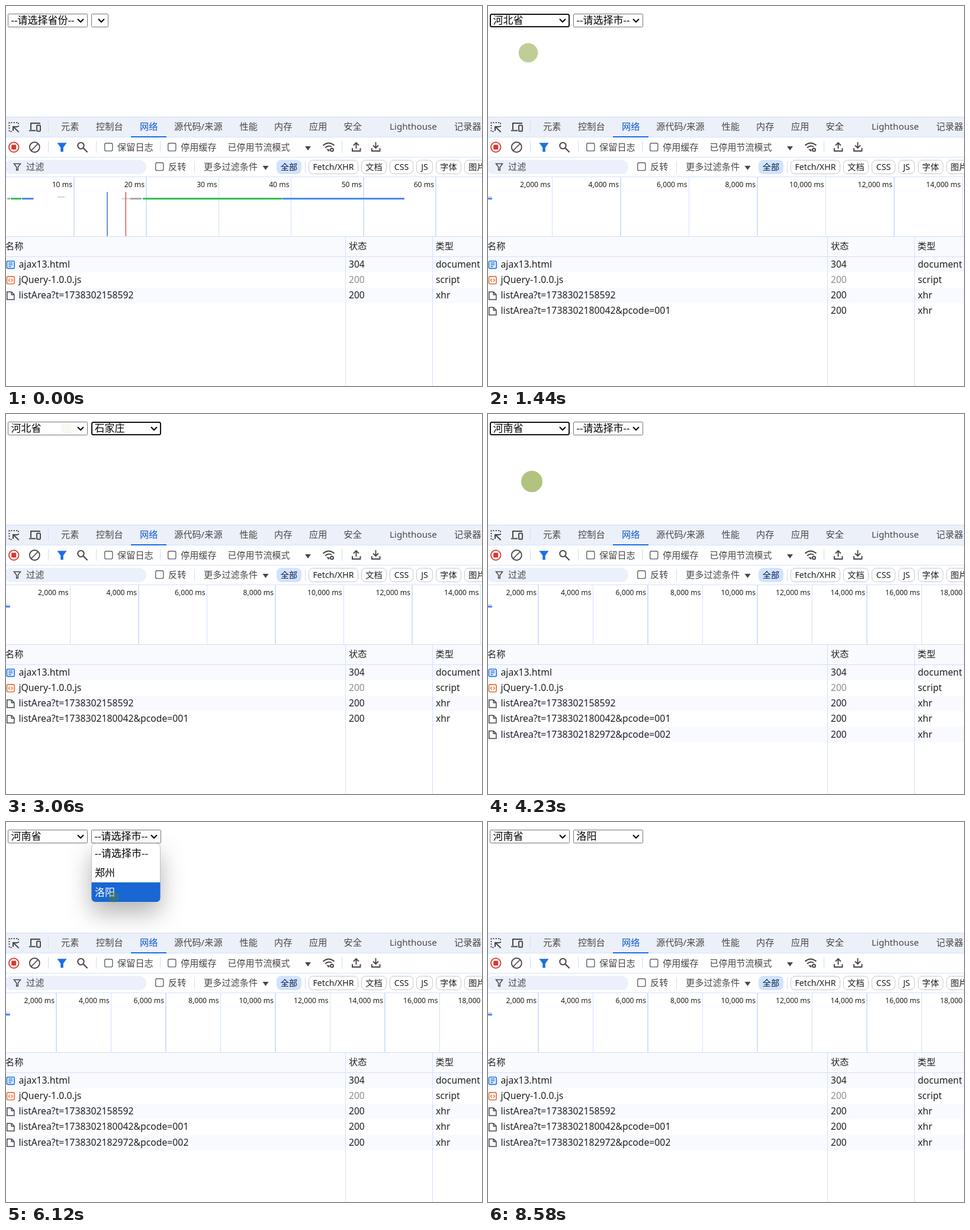
These frames come from a looping animation (804 px wide and 642 px high, 8670 ms). An HTML page:

```html
<!DOCTYPE html>
<html lang="zh-CN">
<head>
<meta charset="utf-8">
<title>省市联动</title>
<style>
  html, body { margin: 0; width: 100%; height: 100%; overflow: hidden; background: #fff; }
  svg { display: block; width: 804px; height: 642px; }
  text { font-family: "Noto Sans", "Noto Sans CJK SC", "Noto Sans CJK", sans-serif; white-space: pre; }
</style>
</head>
<body>
<svg viewBox="0 0 804 642">
  <defs>
    <filter id="shadow" x="-70%" y="-60%" width="240%" height="260%">
      <feDropShadow dx="0" dy="18" stdDeviation="20" flood-color="#000" flood-opacity=".3"/>
    </filter>
  </defs>
  <g id="tools"></g>
  <g id="requests"></g>
  <g id="page"></g>
  <circle id="halo" fill="#648700"/>
</svg>
<script>
const LOOP = 8670, STEP = 90;
const INK = '#474747', DARK = '#1f1f1f', BLUE = '#1a6fe8', LINE = '#d3e1fb';
const $ = id => document.getElementById(id);

const text = (x, y, s, size = 15.2, fill = INK, anchor = 'start') =>
  `<text x="${x}" y="${y}" font-size="${size}" fill="${fill}" text-anchor="${anchor}">${s.replace(/&/g, '&amp;')}</text>`;
const rect = (x, y, w, h, fill, rx = 0, extra = '') =>
  `<rect x="${x}" y="${y}" width="${w}" height="${h}" fill="${fill}" rx="${rx}" ${extra}/>`;
const outline = (x, y, w, h, stroke, rx, width = 1) =>
  rect(x, y, w, h, 'none', rx, `stroke="${stroke}" stroke-width="${width}"`);
const path = (d, stroke = INK, width = 1.7, fill = 'none') =>
  `<path d="${d}" stroke="${stroke}" stroke-width="${width}" fill="${fill}"/>`;
const ring = (x, y, r, stroke, width = 1.8) =>
  `<circle cx="${x}" cy="${y}" r="${r}" fill="none" stroke="${stroke}" stroke-width="${width}"/>`;
const checkbox = (x, y) => outline(x + .7, y + .7, 13.2, 13.2, '#5f6368', 2.5, 1.4);
const triangle = (x, y) => path(`M${x} ${y}h10l-5 7z`, 'none', 0, INK);
const divider = (x, y) => rect(x, y, 1, 20, '#cfdef9');

function drawTools() {
  const tabs = [[93, '元素'], [152, '控制台'], [226, '网络'], [284, '源代码/来源'], [394.5, '性能'],
    [453, '内存'], [512, '应用'], [570.5, '安全'], [648, 'Lighthouse'], [757, '记录器']];
  const chips = [[511, 84, 'Fetch/XHR'], [600, 43, '文档'], [648, 40, 'CSS'], [693, 28, 'JS'],
    [726, 43, '字体'], [774, 43, '图片']];
  return [
    rect(0, 187, 804, 34, '#ecf0f9'),
    ...[187, 221, 255, 288].map(y => rect(0, y, 804, 1, LINE)),
    ...tabs.map(([x, s]) => text(x, 209, s, 15.2, s === '网络' ? '#0b57d0' : INK)),
    rect(211, 220, 60, 2, BLUE),
    // inspect and device icons
    `<g stroke-dasharray="2 2.4">${path('M21 204V197H5.5V212H12', INK, 2)}</g>`,
    path('M21.5 213L12.5 204M12 211V204H20', INK, 2),
    path('M42 209V198H58M39 210.5H50', INK, 2),
    outline(52, 201.5, 6, 10, INK, 1, 1.9),
    divider(71, 194),
    // toolbar
    ring(13.2, 238.5, 8.3, '#dc362e', 1.8), rect(9.2, 234.5, 8, 8, '#dc362e', 1),
    ring(48.3, 238.5, 8.5, INK), path('M42.3 244.5L54.3 232.5'),
    divider(71, 228),
    path('M87 231.5H102L96.5 239V246H92.5V239Z', BLUE, .6, BLUE),
    ring(126.5, 236, 5.2, INK, 2), path('M130.3 239.8L137.5 247', INK, 2.2),
    divider(152, 228), checkbox(166, 231), text(188, 244, '保留日志'),
    divider(260, 228), checkbox(273, 231), text(295, 244, '停用缓存'),
    text(374.5, 244, '已停用节流模式', 15), triangle(505, 237),
    path('M535.5 235.5Q545 227.5 554.5 235.5M539 239.5Q545 234.5 550 238', INK, 2),
    path('M541.5 241.5L545 245.5L546.5 242.5', INK, 1, INK), ring(550.5, 243, 2.5, INK, 2),
    divider(567, 228),
    path('M591.5 241V231.5M587 235.5L591.5 231L596 235.5M585 240V245H598.5V240', INK, 1.9),
    path('M624.5 230V239.5M620 235.5L624.5 240L629 235.5M618 240V245H631.5V240', INK, 1.9),
    // filter bar
    rect(-3, 260, 240, 24, '#ebf0fa', 12),
    path('M13.5 266.5H24.5L20.3 272V277.5H17.7V272Z', INK, 1.5),
    text(34, 277, '过滤'), checkbox(252, 264), text(274, 277, '反转'),
    divider(318, 262), text(334, 277, '更多过滤条件'), triangle(433.5, 270),
    rect(457, 260, 42, 24, '#d3e3fd', 8), text(478, 277, '全部', 14.2, '#041e49', 'middle'),
    divider(505, 262),
    ...chips.map(([x, w, s]) => outline(x + .5, 260.5, w - 1, 23, '#c4c7cc', 7)
      + text(x + w / 2, 277, s, 14.2, DARK, 'middle')),
  ].join('');
}

// Each view: first grid line, spacing, label unit, number of listed requests.
const VIEWS = [
  { x: 115, pitch: 122.2, unit: 10, rows: 3 },
  { x: 108.5, pitch: 115.5, unit: 2000, rows: 4 },
  { x: 85, pitch: 92.5, unit: 2000, rows: 5 },
];
const REQUESTS = [
  ['ajax13.html', '304', 'document'],
  ['jQuery-1.0.0.js', '200', 'script'],
  ['listArea?t=1738302158592', '200', 'xhr'],
  ['listArea?t=1738302180042&pcode=001', '200', 'xhr'],
  ['listArea?t=1738302182972&pcode=002', '200', 'xhr'],
];

function requestIcon(type, y) {
  if (type === 'document')
    return outline(1.5, y - 6, 12.6, 12.4, BLUE, 1.5, 1.6)
      + path(`M4.2 ${y - 2.8}h7.2M4.2 ${y + .2}h7.2M4.2 ${y + 3.2}h4.5`, BLUE, 1.4);
  if (type === 'script')
    return outline(1.5, y - 6, 12.6, 12.4, '#ec6a32', 1.5, 1.6)
      + path(`M6.6 ${y - 2.3}l-2.3 2.5l2.3 2.5M9 ${y - 2.3}l2.3 2.5l-2.3 2.5`, '#ec6a32', 1.4);
  return path(`M1.8 ${y - 6.2}h7.6l4.5 4.5v8.3h-12.1zM9.2 ${y - 6}v4.5h4.5`, INK, 1.5);
}

function drawRequests(view) {
  const { x, pitch, unit, rows } = VIEWS[view];
  let out = '';
  for (let i = 0; i < 9; i++) {
    // A line centred on a pixel edge covers two pixels.
    const lineX = Math.round((x + i * pitch) * 2) / 2;
    const width = Number.isInteger(lineX) ? 2 : 1;
    out += rect(lineX - width / 2, 289, width, 100, LINE);
    out += text(lineX - 3, 306, `${((i + 1) * unit).toLocaleString('en-US')} ms`, 12.2, DARK, 'end');
  }
  const bar = (from, to, fill, y = 324) => rect(from, y, to - from, 3, fill);
  const GREEN = '#34c05a', WAVE = '#4d8bf0';
  out += view
    ? bar(0, 6, '#dedede', 321) + bar(0, 7, WAVE)
    : bar(2, 7, '#a9b5a9') + bar(8, 26, GREEN) + bar(27, 46.5, WAVE) + bar(87, 99, '#dedede', 321)
      + bar(196, 210, '#dcdcdc') + bar(210, 229, '#a9a9a9') + bar(231, 466.5, GREEN) + bar(467, 673, WAVE)
      + rect(170.3, 314, 1.5, 75, '#3f6fc4') + rect(201.7, 314, 1.2, 75, '#d93025');

  out += rect(0, 389, 804, 35, '#f8fafe') + rect(0, 389, 804, 1, LINE) + rect(0, 423, 804, 1, LINE);
  out += text(-1, 411, '名称', 15.2, DARK) + text(579, 411, '状态', 15.2, DARK) + text(725.5, 411, '类型', 15.2, DARK);
  REQUESTS.slice(0, rows).forEach(([name, status, type], i) => {
    const y = 437 + i * 26.15;
    if (i % 2 === 0) out += rect(0, y - 13, 804, 26, '#f8faff');
    out += requestIcon(type, y) + text(21.5, y + 5, name, 15.75, DARK)
      + text(579, y + 5, status, 15.6, i === 1 ? '#8c8c8c' : DARK) + text(726, y + 5, type, 15.6, DARK);
  });
  return out + rect(573, 390, 1, 252, LINE) + rect(720, 390, 1, 252, LINE);
}

const PICK_PROVINCE = '--请选择省份--', PICK_CITY = '--请选择市--';
const PROVINCES = [PICK_PROVINCE, '河北省', '河南省'];
const CITIES = [[], [PICK_CITY, '石家庄', '保定'], [PICK_CITY, '郑州', '洛阳']];

function select(x, w, label, focused) {
  const box = focused
    ? rect(x + 1, 14, w - 2, 21, '#fff', 2.5, 'stroke="#101010" stroke-width="2"')
    : rect(x + .5, 13.5, w - 1, 22, '#fff', 1, 'stroke="#767676"');
  return box + text(x + 5.5, 30, label, 17, '#000')
    + path(`M${x + w - 17} 22l5 5l5 -5`, '#000', 2);
}

function dropdown(x, w, items, hot) {
  const rowTop = i => 36 + i * 33;
  const ends = [
    `M${x} 69V43q0 -7 7 -7h${w - 14}q7 0 7 7V69z`,
    `M${x} 69h${w}v33h${-w}z`,
    `M${x} 102h${w}v26q0 7 -7 7h${14 - w}q-7 0 -7 -7z`,
  ];
  return `<g filter="url(#shadow)">${rect(x, 36, w, 99, '#fff', 7, 'stroke="#b4b4b4" stroke-width=".8"')}</g>`
    + path(ends[hot], 'none', 0, '#1967d2')
    + items.map((s, i) => text(x + 5.5, rowTop(i) + 23, s, 17, i === hot ? '#fff' : '#000')).join('');
}

function drawPage({ province, city, focus, open, hot }) {
  const cities = CITIES[province], cityWidth = cities.length ? 118 : 29;
  let out = select(3, 135, PROVINCES[province], focus === 'province')
    + select(144, cityWidth, cities[city] || '', focus === 'city');
  if (open === 'province') out += dropdown(3.5, 134, PROVINCES, hot);
  if (open === 'city') out += dropdown(144.5, 116, cities, hot);
  return out;
}

const STATES = [];
[
  [0, { province: 0, city: 0, focus: '', open: '', hot: 0, view: 0 }],
  [720, { open: 'province' }],
  [900, { hot: 1 }],
  [1260, { province: 1, focus: 'province', open: '', view: 1 }],
  [2160, { focus: '', open: 'city', hot: 0 }],
  [2250, { hot: 1 }],
  [2520, { city: 1, focus: 'city', open: '' }],
  [3150, { focus: '', open: 'province', hot: 1 }],
  [3420, { hot: 2 }],
  [4140, { province: 2, city: 0, focus: 'province', open: '', view: 2 }],
  [5670, { focus: '', open: 'city', hot: 0 }],
  [5760, { hot: 1 }],
  [5850, { hot: 2 }],
  [6570, { city: 2, focus: 'city', open: '' }],
  [8580, { focus: '' }],
].forEach(([at, change]) => STATES.push({ ...STATES.at(-1), ...change, at }));

// Pointer keys: time, x, y, radius, opacity.
const ripple = (t, x, y) => [[t, x, y, 18, .5], [t + 90, x, y, 16.3, .41], [t + 180, x, y, 13, .22],
  [t + 270, x, y, 10, .05], [t + 360, x, y, 9, 0]];
const TRACKS = [
  [[90, 40, 4, 9, .4], [270, 100, 24, 9, .4], ...ripple(450, 102, 24)],
  [[990, 68, 79, 9, .4], [1170, 68, 79, 9, .4], ...ripple(1350, 68, 79)],
  [[1980, 200, 24, 14, .45], ...ripple(2070, 200, 24)],
  [[2340, 190, 84, 9, .4], ...ripple(2430, 190, 86).slice(0, 3), [2700, 102, 24, 9, .4],
    ...ripple(2790, 102, 24)],
  [[3880, 73, 114.5, 9, .4], [4060, 73, 114.5, 9, .4], ...ripple(4230, 74, 114)],
  [[5400, 172, 22, 14, .45], ...ripple(5490, 172, 22).slice(0, 4), [5850, 172, 40, 9, .3], [6119, 172, 40, 9, .3]],
  [[6120, 182, 127, 9, .35], [6400, 182, 127, 9, .35], ...ripple(6570, 182, 127)],
  [[7320, 94, 69, 9.2, .4], [7680, 78, -10, 9.2, .4]],
];
const BURSTS = [0, 1980, 3880, 4140, 5400, 6120, 6480, 7320, 8580];

function snap(t) {
  const start = BURSTS.findLast(b => b <= t);
  return start + Math.floor((t - start) / STEP) * STEP;
}

function pointerAt(t) {
  const track = TRACKS.find(k => t >= k[0][0] && t <= k.at(-1)[0]);
  if (!track) return [0, 0, 0, 0, 0];
  const i = Math.max(1, track.findIndex(k => k[0] >= t));
  const a = track[i - 1], b = track[i], p = (t - a[0]) / (b[0] - a[0]);
  return a.map((v, j) => v + (b[j] - v) * p);
}

let shownState, shownView;
function render(now) {
  const t = snap(now % LOOP);
  const state = STATES.findLast(s => s.at <= t);
  if (state !== shownState) $('page').innerHTML = drawPage(shownState = state);
  if (state.view !== shownView) $('requests').innerHTML = drawRequests(shownView = state.view);
  const [, x, y, r, opacity] = pointerAt(t);
  Object.entries({ cx: x, cy: y, r, opacity }).forEach(([k, v]) => $('halo').setAttribute(k, v));
}

$('tools').innerHTML = drawTools();
const begin = performance.now();
render(0);
requestAnimationFrame(function tick() {
  render(performance.now() - begin);
  requestAnimationFrame(tick);
});
</script>
</body>
</html>
```
